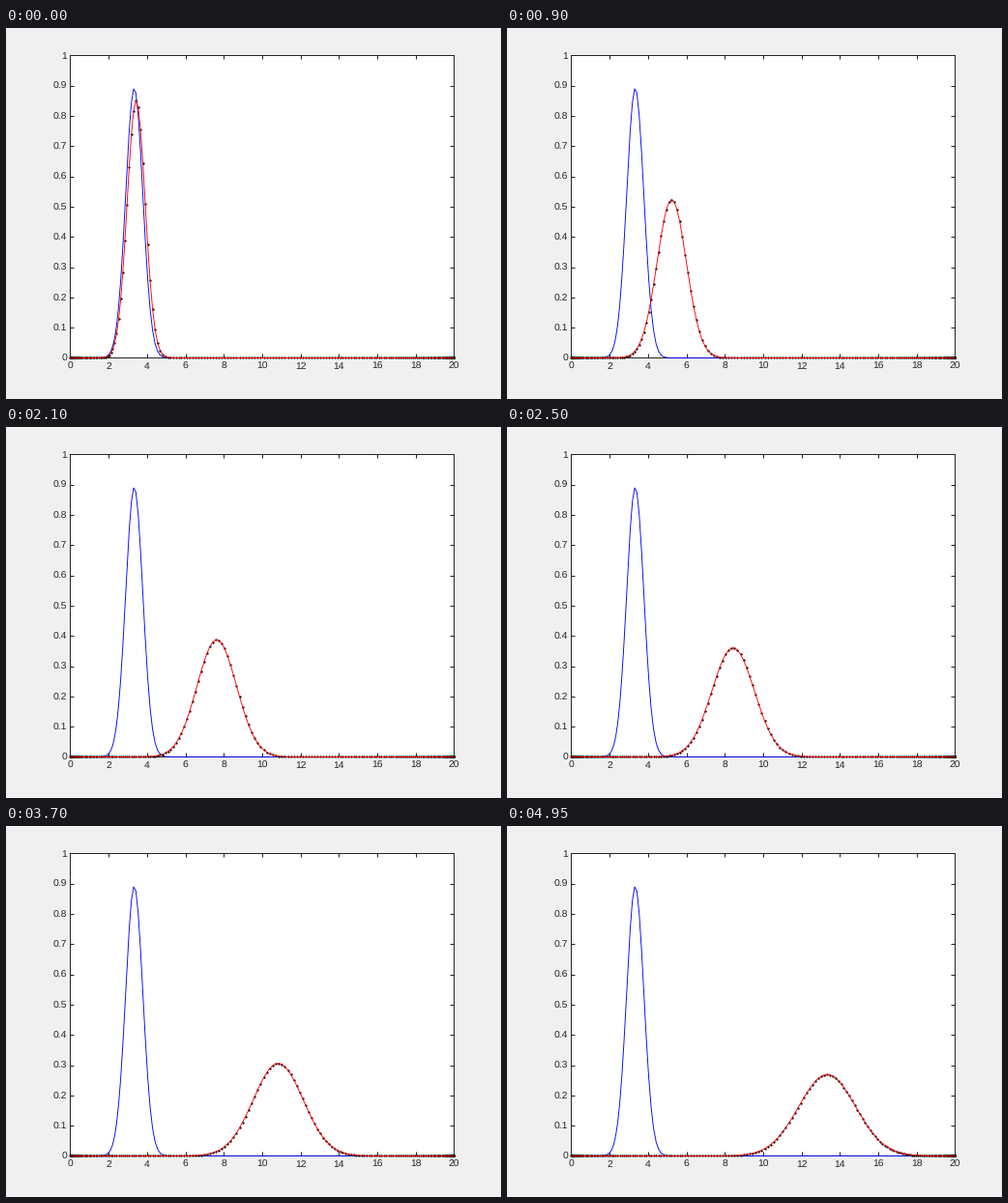
These frames come from a looping animation (512 by 384 pixels, 5000 ms). A matplotlib script:

```python
import numpy as np
import matplotlib.pyplot as plt
from matplotlib.animation import FuncAnimation

W, H, DPI = 512, 384, 64
PX = 72 / DPI                       # one pixel in points
# just under the half pixel, so the box snaps to the pixel it lies in
LEFT, RIGHT, TOP, BOTTOM = 66.48, 463.48, 28.48, 341.48
FRAMES, INTERVAL = 100, 50
INK = "#262626"

START, SPEED, DIFFUSION = 10 / 3, 1.0, 0.1
DT = 0.1

# Chebyshev points mapped onto [0, 20]
x = 10 * (1 - np.cos(np.pi * np.arange(200) / 199))


def pulse(t):
    """Advected, diffusing Gaussian of unit mass."""
    var = 2 * DIFFUSION * (1 + t)
    gap = x - START - SPEED * t
    return np.exp(-gap**2 / (2 * var)) / np.sqrt(2 * np.pi * var)


plt.rcParams["font.family"] = "Liberation Sans"
plt.rcParams["text.hinting"] = "no_hinting"
fig = plt.figure(figsize=(W / DPI, H / DPI), dpi=DPI, facecolor="#f0f0f0")
ax = fig.add_axes([LEFT / W, 1 - BOTTOM / H,
                   (RIGHT - LEFT) / W, (BOTTOM - TOP) / H])
ax.set_xlim(0, 20)
ax.set_ylim(0, 1)

xticks = np.arange(0, 21, 2)
yticks = np.arange(11) / 10
ax.set_xticks(xticks, [f"{v:g}" for v in xticks])
ax.set_yticks(yticks, [f"{v:g}" for v in yticks])
ax.tick_params(direction="in", top=True, right=True, length=4 * PX,
               width=PX, color=INK, labelcolor=INK, labelsize=10.4 * PX)
ax.tick_params(axis="x", pad=4 * PX)
ax.tick_params(axis="y", pad=3.5 * PX)
for side in ax.spines.values():
    side.set_linewidth(PX)
    side.set_color(INK)

thin = dict(lw=0.9 * PX, clip_on=False)
ax.plot(x, pulse(0), color="#0000ff", zorder=3, **thin)
dots = ax.scatter(x, pulse(DT), s=(2.3 * PX)**2, color="black",
                  linewidths=0, zorder=4, clip_on=False)
curve, = ax.plot([], [], color="#ff0000", zorder=5, **thin)


def update(i):
    y = pulse((i + 1) * DT)
    dots.set_offsets(np.column_stack([x, y]))
    curve.set_data(x, y)
    return dots, curve


anim = FuncAnimation(fig, update, frames=FRAMES, interval=INTERVAL,
                     repeat=True, repeat_delay=0)
plt.show()
```
